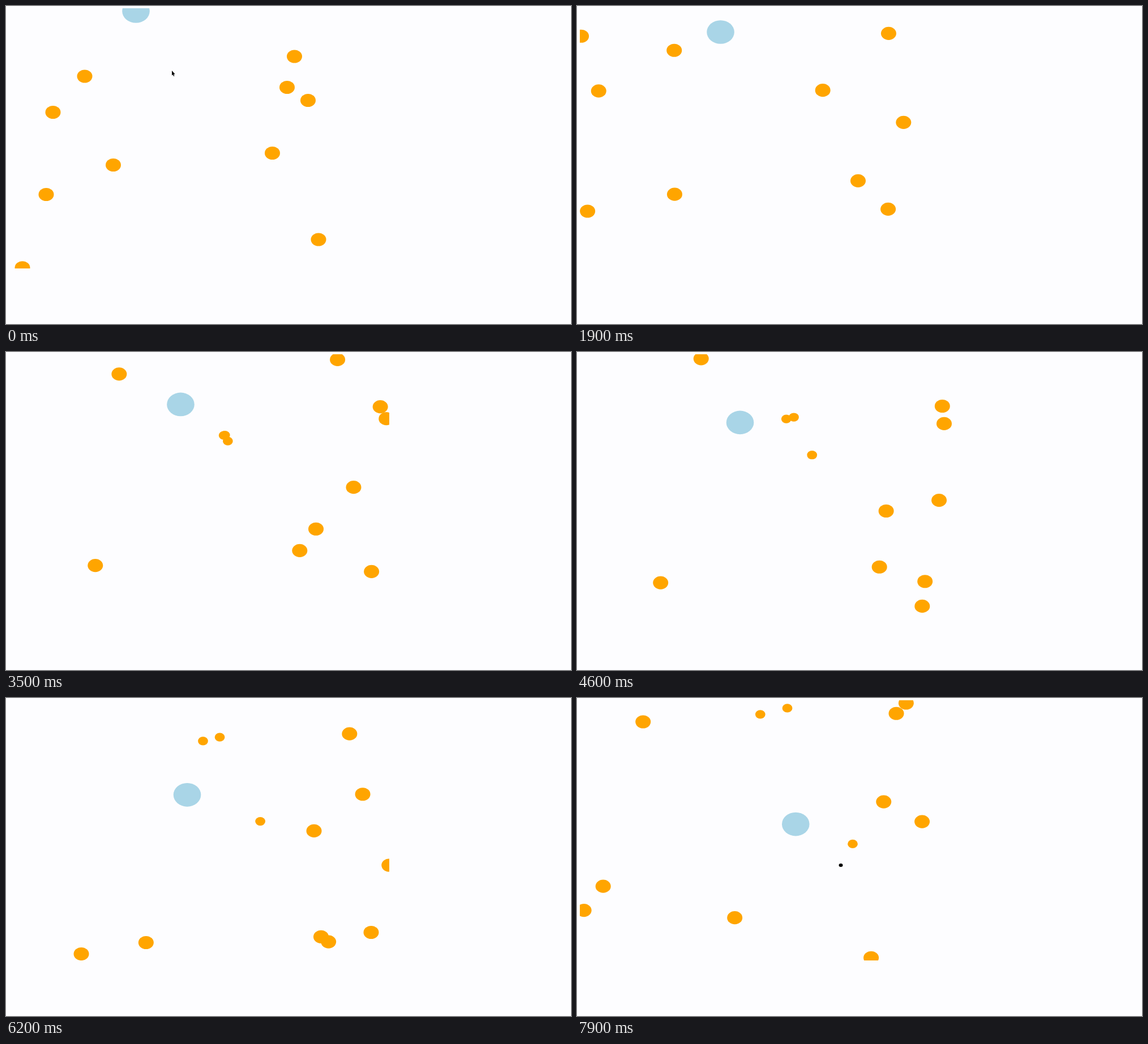
An HTML page with a canvas for the animation above (8 s loop, 998 by 561 pixels).

```html
<!DOCTYPE html>
<html lang="en">
<head>
<meta charset="utf-8">
<title>Drifting rocks</title>
<style>
  html, body { margin: 0; width: 100%; height: 100%; overflow: hidden; background: #fdfdff; }
  canvas { display: block; }
</style>
</head>
<body>
<canvas id="stage" width="998" height="561"></canvas>
<script>
const ctx = document.getElementById('stage').getContext('2d');
const LOOP = 8000, STEP = 100;
const FIELD = { x: 5, y: 4, w: 672, h: 459 };
const ASPECT = 0.857;     // the field is squashed vertically
const ROCK_SPEED = 33.5;  // every rock and fragment, px per game second
const SHIP_SPEED = 37;
const BACK = '#fdfdff', ORANGE = '#ffa500', BLUE = '#a9d5e7';

// real seconds -> game seconds: a slow start, then nearly even
const CLOCK = [[0, 0], [0.7, 0.61], [1.9, 1.87], [6.2, 6.19], [7.9, 7.98]];

// start x, y and heading in degrees
const ROCKS = [
  [509.5, 89, -49.2], [29, 461.8, 110], [83, 187.5, -135.6],
  [139, 124, -58.5], [189.5, 280.5, 105.8], [71, 332.5, 146.7],
  [533.5, 166.5, 46.3], [470.5, 259.5, 65.5], [552, 412, -92.2]
];
const TARGET = [496.5, 143.5, 174.5];
const HIT = 3.27;
const FRAGMENTS = [-113.8, -95.8, 50.9];

// fired at, arrives at (real seconds), end point
const SHOTS = [[2.95, 3.3, 387, 152.7], [7.55, 7.9, 466, 295]];

const mix = (a, b, k) => a + (b - a) * k;
const wrap = (v, start, size) => start + ((v - start) % size + size) % size;
const span = (s, from, to) => Math.max(0, Math.min(s, to) - from);

function gameTime(t) {
  const i = Math.max(1, CLOCK.findIndex(k => k[0] >= t));
  const [t0, s0] = CLOCK[i - 1], [t1, s1] = CLOCK[i];
  return mix(s0, s1, (t - t0) / (t1 - t0));
}

// steady fall; steered right, left, let go, then right again
function shipAt(s) {
  const steer = span(s, 1.22, 3.416) - span(s, 3.416, 4.03) + span(s, 5.325, 9);
  return [229.5 + SHIP_SPEED * steer, 9 + 28.9 * span(s, 0.59, 9)];
}

function drift([x, y, deg], s) {
  const a = deg * Math.PI / 180, d = ROCK_SPEED * s;
  return [
    wrap(x + Math.cos(a) * d, FIELD.x, FIELD.w),
    wrap(y + Math.sin(a) * d * ASPECT, FIELD.y, FIELD.h)
  ];
}

function disc([x, y], r, color) {
  ctx.fillStyle = color;
  ctx.beginPath();
  ctx.ellipse(x, y, r, r * ASPECT, 0, 0, Math.PI * 2);
  ctx.fill();
}

function cursor(x, y) {
  ctx.fillStyle = '#000';
  ctx.fill(new Path2D(`M${x} ${y}v8.5l1.8-1.5 1.4 3 1.2-.6-1.2-3 2.4-.2z`));
}

function draw(t) {
  const s = gameTime(t);
  ctx.fillStyle = BACK;
  ctx.fillRect(0, 0, 998, 561);

  ctx.save();
  ctx.beginPath();
  ctx.rect(FIELD.x, FIELD.y, FIELD.w, FIELD.h);
  ctx.clip();

  disc(shipAt(s), 24.3, BLUE);
  for (const r of ROCKS) disc(drift(r, s), 13.5, ORANGE);

  if (s < HIT) {
    disc(drift(TARGET, s), 13.5, ORANGE);
  } else {
    const origin = drift(TARGET, HIT);
    for (const deg of FRAGMENTS) disc(drift([...origin, deg], s - HIT), 8.9, ORANGE);
  }

  for (const [from, to, x, y] of SHOTS) {
    if (t < from || t > to) continue;
    const [sx, sy] = shipAt(gameTime(from));
    const k = (t - from) / (to - from);
    disc([mix(sx, x, k), mix(sy, y, k)], 3.5, '#000');
  }
  ctx.restore();

  if (t <= 0.2) cursor(mix(293, 915, t / 0.2), 114);
}

const start = performance.now();
function tick() {
  const ms = (performance.now() - start) % LOOP;
  draw(Math.floor(ms / STEP) * STEP / 1000);
  requestAnimationFrame(tick);
}
tick();
</script>
</body>
</html>
```
